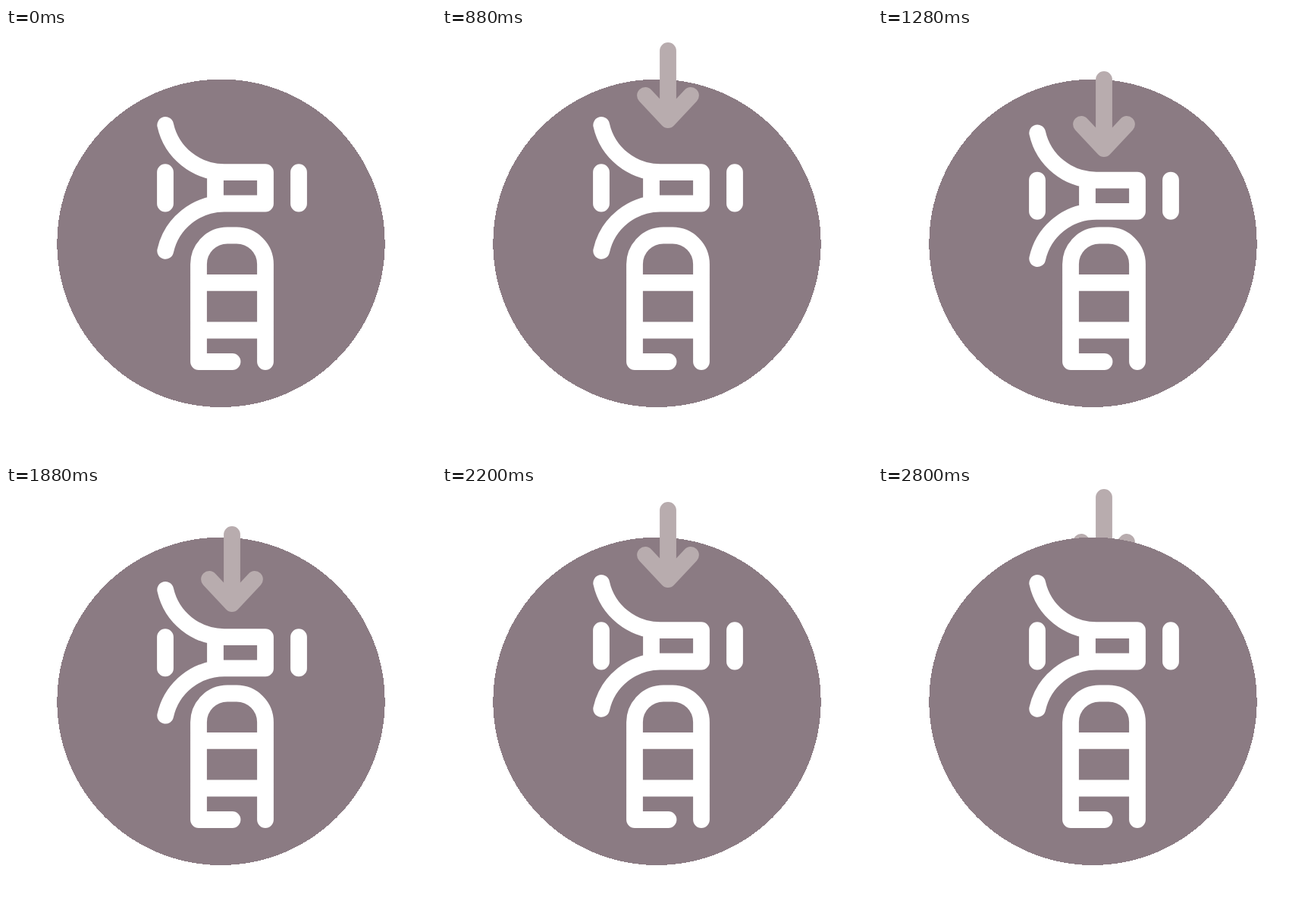
Recreate the animation shown at these times as an HTML page. Size 567 px wide and 567 px high, loop 2.84 s.

```html
<!DOCTYPE html>
<html lang="en">
<head>
<meta charset="utf-8">
<title>Pressing arrow</title>
<style>
  html, body { margin: 0; width: 100%; height: 100%; overflow: hidden; background: #fff; }
  svg { display: block; width: 100%; height: 100%; }
  .line { fill: none; stroke-width: 21.8; stroke-linecap: round; stroke-linejoin: round; }
</style>
</head>
<body>
<svg viewBox="0 0 567 567">
  <g class="line" stroke="#b8acae"><path id="arrowBehind" d="M298 15V106M268 74L298 106L328 74"/></g>
  <circle cx="283.5" cy="283.8" r="216.2" fill="#8b7b83" shape-rendering="crispEdges"/>
  <g class="line" stroke="#fff">
    <path d="M342 440V311.5A38 38 0 0 0 304 273.5H292A38 38 0 0 0 254 311.5V440H298.5M254 335.8H342M254 398.5H342"/>
    <path id="head" d="M210.2 128A79.5 79.5 0 0 0 288 190.2H342V231.5H288A79.5 79.5 0 0 0 210.2 293.8M276 190.2V231.5M210 190.2V231.5M386 190.2V231.5"/>
  </g>
  <g class="line" stroke="#b8acae"><path id="arrowFront" d="M298 15V106M268 74L298 106L328 74"/></g>
</svg>
<script>
  const LOOP = 2840, STEP = 40;
  const TRAVEL = 53, SPEED = 0.1;   // px and px per ms
  const CONTACT = 24.3, PUSH = 0.36; // the head follows once the arrow has come this far
  const byId = id => document.getElementById(id);
  const head = byId("head"), front = byId("arrowFront"), behind = byId("arrowBehind");
  const clamp = (v, lo, hi) => Math.min(hi, Math.max(lo, v));
  const moveY = (el, y) => el.setAttribute("transform", `translate(0 ${y})`);
  const show = (el, on) => el.setAttribute("visibility", on ? "visible" : "hidden");

  function arrowShift(t) {
    const down = clamp((t - 730) * SPEED, 0, TRAVEL);
    const up = clamp((t - 1840) * SPEED, 0, TRAVEL);
    return down - up;
  }

  function draw(time) {
    const t = Math.floor((time % LOOP) / STEP) * STEP;
    const y = arrowShift(t);
    moveY(front, y);
    moveY(head, Math.max(0, y - CONTACT) * PUSH);
    show(front, t >= 440 && t < 2800);
    show(behind, t >= 2800);
  }

  let start;
  function tick(now) {
    start ??= now;
    draw(Math.max(0, now - start));
    requestAnimationFrame(tick);
  }
  draw(0);
  requestAnimationFrame(tick);
</script>
</body>
</html>
```
